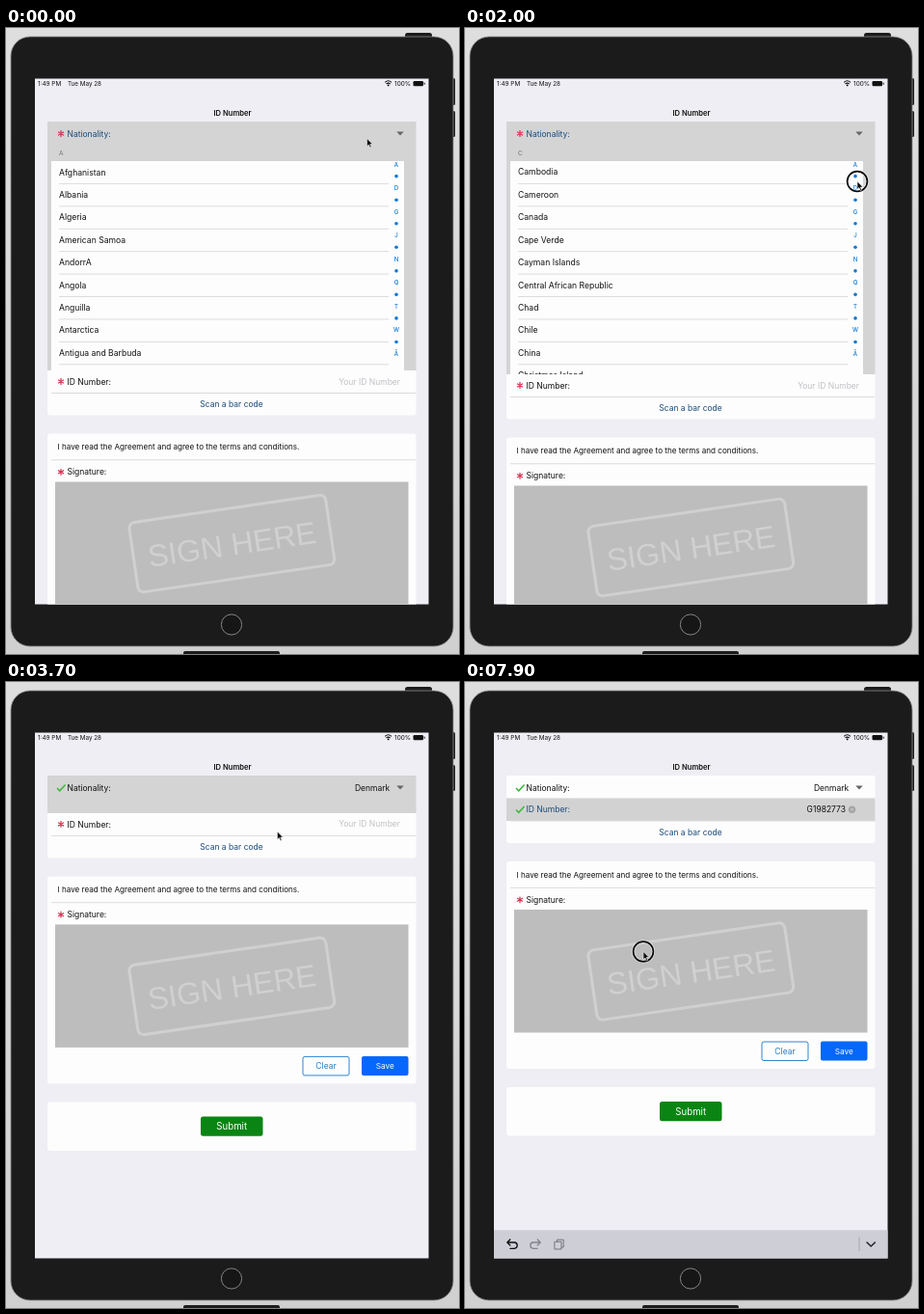
An HTML page for the animation above (8000 ms loop, 470 by 649 pixels).

```html
<!DOCTYPE html>
<html lang="en">
<head>
<meta charset="utf-8">
<title>ID Number form</title>
<style>
html, body { margin: 0; width: 100%; height: 100%; overflow: hidden; background: #d9d9d9; }
svg { display: block; width: 470px; height: 649px; }
text { font-family: Inter, sans-serif; font-size: 8.5px; fill: #111; }
.mid { text-anchor: middle; }
.end { text-anchor: end; }
.card { fill: #fdfdfd; }
.rule { stroke: #dcdce0; stroke-width: 1; }
.link { fill: #1b4b7a; }
.hint { fill: #c0c0c6; }
.icon { fill: none; stroke-width: 1.3; stroke-linecap: round; stroke-linejoin: round; }
</style>
</head>
<body>
<svg viewBox="0 0 470 649">
  <defs>
    <linearGradient id="bg" x1="0" y1="0" x2="0" y2="1">
      <stop offset="0" stop-color="#dedede"/><stop offset="1" stop-color="#d0d0d0"/>
    </linearGradient>
    <clipPath id="screen"><rect x="30" y="52.5" width="408.5" height="545"/></clipPath>
    <clipPath id="window"><rect id="windowBox" x="43" y="121" width="383" height="238"/></clipPath>
    <path id="star" d="M0-3.4V3.4M-3-1.7L3 1.7M-3 1.7L3-1.7" stroke="#dc3055" stroke-width="1.2"/>
    <path id="tick" d="M-4 .5L-1.3 3.3L4.6-3" fill="none" stroke="#3db83a" stroke-width="1.5"/>
    <path id="sweep" d="M302 259H248C215 259 190 269 172 278C155 287 140 297 132 305C146 316 172 323 196 321C216 318 230 305 229 289C228 276 215 273 202 274Q193 276 185 279.5"/>
  </defs>

  <rect width="470" height="649" fill="url(#bg)"/>
  <rect x="414" y="5" width="28" height="8" rx="2.5" fill="#1c1c1d"/>
  <rect x="459" y="52" width="7" height="28" rx="1.5" fill="#1c1c1d"/>
  <rect x="459" y="86" width="7" height="27" rx="1.5" fill="#1c1c1d"/>
  <rect x="184" y="646" width="100" height="6" rx="2" fill="#1c1c1d"/>
  <rect x="5" y="9" width="459" height="632" rx="20" fill="#1b1b1c" stroke="#8d8d8f" stroke-width=".8"/>
  <circle cx="234" cy="618.5" r="10.6" fill="#161617" stroke="#858587" stroke-width="1"/>

  <g clip-path="url(#screen)">
    <rect x="30" y="52" width="409" height="546" fill="#efeef4"/>
    <text x="33" y="60" style="font-size:6.4px">1:49 PM</text>
    <text x="64" y="60" style="font-size:6.3px">Tue May 28</text>
    <text x="420" y="60" class="end" style="font-size:6.4px">100%</text>
    <g fill="none" stroke="#111" stroke-width="1.1">
      <path d="M393.2 56.3Q396.6 53.2 400 56.3M394.6 58Q396.6 56.2 398.6 58"/>
    </g>
    <circle cx="396.6" cy="59.4" r=".9"/>
    <rect x="422.5" y="55" width="10.5" height="5.2" rx="1.2" fill="#111"/>
    <rect x="433.7" y="56.7" width="1" height="2" fill="#111"/>
    <text x="235" y="90.6" class="mid" style="font-size:7.6px;font-weight:600">ID Number</text>

    <rect id="panel" x="43" y="97" width="382.5" height="24"/>
    <use id="natStar" href="#star" x="57" y="109.5"/>
    <use id="natTick" href="#tick" x="57" y="109.5"/>
    <text id="natLabel" x="63.5" y="112.5">Nationality:</text>
    <text id="natValue" x="398.3" y="112.5" class="end">Denmark</text>
    <path d="M405.3 107.5H412.7L409 111.6Z" fill="#66666a"/>

    <g id="list" clip-path="url(#window)">
      <g id="rows"></g>
      <g id="index"></g>
    </g>

    <g id="lower">
      <path class="card" d="M43 120.5H425.5V164Q425.5 167 422.5 167H46Q43 167 43 164Z"/>
      <rect id="idRow" x="43" y="120.5" width="382.5" height="23.5" fill="#d2d2d3"/>
      <path class="rule" d="M47 144H425.5"/>
      <use id="idStar" href="#star" x="57" y="132"/>
      <use id="idTick" href="#tick" x="57" y="132"/>
      <text id="idLabel" x="63.5" y="135.2">ID Number:</text>
      <text id="idHint" x="409" y="135" class="end hint">Your ID Number</text>
      <text id="idValue" x="395" y="135" class="end"></text>
      <g id="clear">
        <circle cx="401.5" cy="132.2" r="3.7" fill="#a4a4a6"/>
        <path d="M400.1 130.8L402.9 133.6M402.9 130.8L400.1 133.6" stroke="#d8d8d8" stroke-width=".8"/>
      </g>
      <rect id="caret" y="126" width="1.1" height="11.5" fill="#2b5fae"/>
      <text x="234" y="158.8" class="mid link">Scan a bar code</text>

      <rect class="card" x="43" y="186" width="382.5" height="215" rx="3"/>
      <text x="53.5" y="202.6" style="font-size:8.1px">I have read the Agreement and agree to the terms and conditions.</text>
      <path class="rule" d="M47 213.3H425.5"/>
      <use href="#star" x="57" y="225.8"/>
      <text x="63.5" y="228.8">Signature:</text>
      <rect x="51" y="236" width="366.5" height="127.5" fill="#bdbdbd"/>
      <g transform="translate(234.3 300) rotate(-8.3)">
        <rect x="-103" y="-36.5" width="206" height="73" rx="6" fill="none" stroke="#d0d0d0" stroke-width="3"/>
        <text class="mid" y="12" style="font:32px 'Liberation Sans',sans-serif;fill:#d0d0d0">SIGN HERE</text>
      </g>
      <rect x="308" y="373" width="48" height="19.5" rx="2" fill="#fdfdfd" stroke="#2f86cf"/>
      <text x="332" y="385.8" class="mid" style="fill:#1f7fcc">Clear</text>
      <rect x="369" y="372.5" width="48.5" height="20" rx="2" fill="#0567fb"/>
      <text x="393.2" y="385.8" class="mid" style="fill:#fff;font-size:8.2px">Save</text>

      <rect class="card" x="43" y="420" width="382.5" height="50.5" rx="3"/>
      <rect x="202" y="435" width="64.5" height="20.3" rx="2.5" fill="#0a8513"/>
      <text x="234.2" y="448.7" class="mid" style="fill:#fff;font-size:9.7px">Submit</text>
    </g>

    <g id="bar">
      <rect x="30" y="568.3" width="409" height="30" fill="#cdced6"/>
      <path id="undo" class="icon" d="M46.8 578L43.8 581L46.8 584M44 581H51.2Q54.2 581.2 54.2 584T51.2 587.4H47"/>
      <path class="icon" stroke="#85858a" d="M75.2 578L78.2 581L75.2 584M78 581H70.8Q67.8 581.2 67.8 584T70.8 587.4H75"/>
      <path class="icon" stroke="#75757a" style="stroke-width:1" d="M93.3 580.3H100V588H93.3ZM95.5 580V578.2H102.2V586H100.3"/>
      <path d="M409 575.5V590" stroke="#a8a9b0"/>
      <path class="icon" stroke="#222" style="stroke-width:1.5" d="M417 581L421.2 585L425.4 581"/>
    </g>
  </g>

  <g id="pointer">
    <g id="touch" fill="none">
      <circle r="10.4" stroke="#fff" stroke-opacity=".55" stroke-width="3.4"/>
      <circle r="10.4" stroke="#0b0b0b" stroke-width="1.7"/>
    </g>
    <path d="M0 0V8.2L1.9 6.5L3.2 9.5L4.6 8.9L3.3 6H5.9Z" fill="#0a0a0a" stroke="#f4f4f4" stroke-width=".6"/>
  </g>
</svg>

<script>
const LOOP = 8000, ROW = 23.42, HEAD = 27, LIST_TOP = 111;
const $ = id => document.getElementById(id);
const set = (id, name, value) => $(id).setAttribute(name, value);
const show = (id, on) => set(id, 'visibility', on ? 'visible' : 'hidden');

const sections = {
  A: 'Afghanistan|Albania|Algeria|American Samoa|AndorrA|Angola|Anguilla|Antarctica|Antigua and Barbuda|Argentina|Armenia|Aruba|Australia|Austria|Azerbaijan',
  B: "Bahamas|Bahrain|Bangladesh|Barbados|Belarus|Belgium|Belize|Benin|Bermuda|Bhutan|Bolivia|Bosnia and Herzegovina|Botswana|Bouvet Island|Brazil|British Indian Ocean Territory|Brunei Darussalam|Bulgaria|Burkina Faso|Burundi",
  C: "Cambodia|Cameroon|Canada|Cape Verde|Cayman Islands|Central African Republic|Chad|Chile|China|Christmas Island|Cocos (Keeling) Islands|Colombia|Comoros|Congo|Congo, The Democratic Republic of the|Cook Islands|Costa Rica|Cote D'Ivoire|Croatia|Cuba|Cyprus|Czech Republic",
  D: 'Denmark|Djibouti|Dominica|Dominican Republic',
  E: 'Ecuador|Egypt|El Salvador|Equatorial Guinea|Eritrea|Estonia|Ethiopia',
  F: 'Falkland Islands (Malvinas)|Faroe Islands|Fiji|Finland|France'
};

const jump = {};
function buildList() {
  let y = LIST_TOP, html = '';
  for (const [letter, names] of Object.entries(sections)) {
    jump[letter] = y - LIST_TOP;
    html += `<text x="55" y="${y + 21.2}" style="font-size:6.6px;fill:#77777b">${letter}</text>`;
    y += HEAD;
    const rows = names.split('|');
    html += `<rect x="47" y="${y}" width="366" height="${rows.length * ROW}" fill="#fdfdfd"/>`;
    rows.forEach((name, i) => {
      if (i) html += `<path class="rule" d="M55 ${y}H397"/>`;
      html += `<text x="55" y="${y + 14.5}" style="font-size:8.6px">${name}</text>`;
      y += ROW;
    });
  }
  $('rows').innerHTML = html;
  $('index').innerHTML = [...'A•D•G•J•N•Q•T•W•Å'].map((c, i) => {
    const cy = 141.4 + i * 12.27;
    return c === '•'
      ? `<circle cx="405" cy="${cy}" r="1.8" fill="#0a78d6"/>`
      : `<text x="405" y="${cy + 2.2}" class="mid" style="font-size:6px;font-weight:500;fill:#0a78d6">${c}</text>`;
  }).join('');
}

const clamp = v => Math.max(0, Math.min(1, v));
const smooth = v => v * v * (3 - 2 * v);
const easeOut = v => 1 - (1 - v) ** 3;
const span = (t, a, b) => clamp((t - a) / (b - a));

// keys: [time, ...values]
function track(keys, t, ease = smooth) {
  let i = keys.findIndex(k => k[0] > t);
  if (i < 0) return keys[keys.length - 1].slice(1);
  if (i === 0) return keys[0].slice(1);
  const [a, b] = [keys[i - 1], keys[i]], u = ease(span(t, a[0], b[0]));
  return a.slice(1).map((v, n) => v + (b[n + 1] - v) * u);
}

const moves = [
  [0, 374.5, 114.5], [100, 374.5, 114.5], [400, 300, 270], [650, 300, 190],
  [1100, 416.7, 145.5], [1600, 405, 144], [1700, 405, 147], [2000, 407, 159],
  [2300, 407, 166], [2500, 407, 166], [2950, 281.5, 155], [4200, 281.5, 155],
  [4550, 382.5, 132.5], [6250, 382.5, 132.5], [6800, 302, 259]
];
const presses = [[380, 680], [1650, 2420], [3050, 3220], [4480, 4680], [6850, LOOP]];
const edge = [[0, 355], [200, 359], [3430, 359], [3500, 356.2], [3700, 136], [3860, 120.5]];

function scrollAt(t) {
  if (t < 1650) return 180 * easeOut(span(t, 380, 1080));
  return t < 1800 ? jump.A : t < 1950 ? jump.B : t < 2150 ? jump.C : jump.D;
}

function pointerAt(t) {
  if (t < 6900) return track(moves, t);
  const p = $('sweep');
  const q = p.getPointAtLength(p.getTotalLength() * span(t, 6900, 7900));
  return [q.x, q.y];
}

function draw(t) {
  const picked = t >= 3300, focused = t >= 4550;
  const code = 'G1982773'.slice(0, Math.max(0, Math.ceil((t - 5400) / 105)));
  const [bottom] = track(edge, t, v => v);

  set('panel', 'height', bottom - 97);
  const g = Math.round(212 + 41 * span(t, 3850, 4100));
  set('panel', 'fill', `rgb(${g},${g},${g})`);
  set('windowBox', 'height', Math.max(0, bottom - 121));
  set('lower', 'transform', `translate(0 ${bottom - 120.5})`);
  set('rows', 'transform', `translate(0 ${-scrollAt(t)})`);
  show('list', !picked);
  show('natStar', !picked);
  show('natTick', picked);
  show('natValue', picked);
  $('natLabel').style.fill = picked ? '#111' : '#1b4b7a';

  show('idRow', focused);
  show('idStar', !code);
  show('idTick', code);
  show('idHint', !code);
  show('clear', code);
  $('idLabel').style.fill = focused ? '#1b4b7a' : '#111';
  $('idHint').style.fill = focused ? '#a9a9ad' : '#c0c0c6';
  $('idValue').textContent = code;
  show('caret', focused && t < 6500 && (t < 5100 || code || t % 1000 < 500));
  set('caret', 'x', code ? 395.6 : 408.3);

  show('bar', focused);
  set('bar', 'transform', `translate(0 ${30 * (1 - easeOut(span(t, 4550, 4850)))})`);
  set('undo', 'stroke', code ? '#111' : '#75757a');

  const [x, y] = pointerAt(t);
  set('pointer', 'transform', `translate(${x} ${y})`);
  show('touch', presses.some(([a, b]) => t >= a && t < b));
}

function frame() {
  draw(performance.now() % LOOP);
  requestAnimationFrame(frame);
}
buildList();
frame();
</script>
</body>
</html>
```
